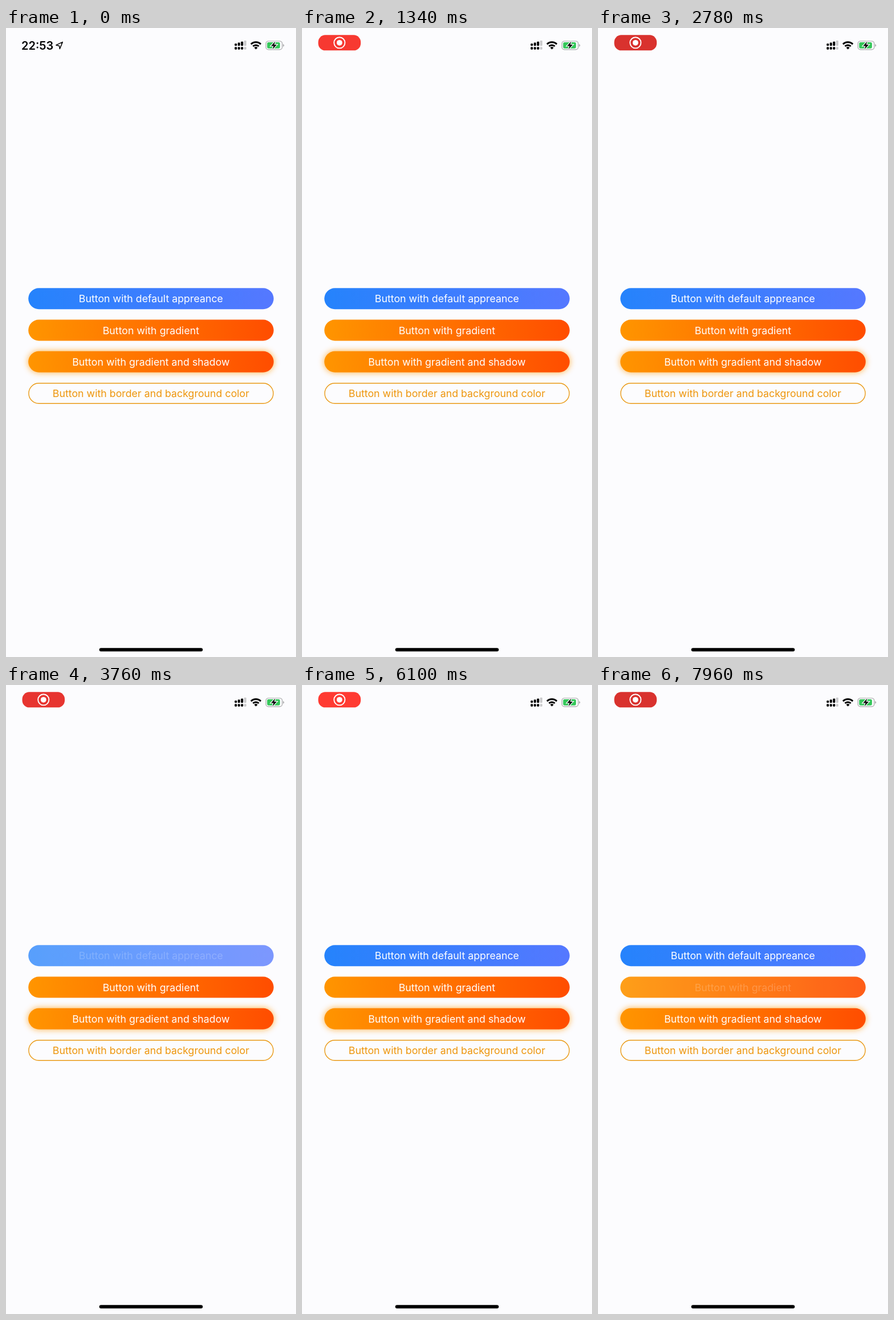
Animation of 509x1101 px, one loop 8 s. Source, as an HTML page:

```html
<!DOCTYPE html>
<html lang="en">
<head>
<meta charset="utf-8">
<title>Buttons</title>
<style>
  html, body { margin: 0; width: 100%; height: 100%; overflow: hidden; background: #fcfcfe; }
  svg { display: block; width: 100vw; height: 100vh; }
  text { font-family: Inter, Roboto, sans-serif; }
  .title { font-size: 17.8px; text-anchor: middle; }
</style>
</head>
<body>
<svg viewBox="0 0 509 1101">
  <defs>
    <linearGradient id="blue">
      <stop offset="0" stop-color="#2583fc"/><stop offset="1" stop-color="#5578ff"/>
    </linearGradient>
    <linearGradient id="orange">
      <stop offset="0" stop-color="#ff9500"/><stop offset="1" stop-color="#ff4d00"/>
    </linearGradient>
    <filter id="blur" x="-10%" y="-100%" width="120%" height="300%">
      <feGaussianBlur stdDeviation="6.1"/>
    </filter>
  </defs>
  <rect width="509" height="1101" fill="#fcfcfe"/>

  <g id="clock">
    <text x="27" y="37.7" font-size="20" font-weight="600">22:53</text>
    <path d="M99.3 24.6 L87.9 29.9 L93.4 31.2 L94.4 36.5 Z" fill="none" stroke="#000" stroke-width="1.5" stroke-linejoin="round"/>
  </g>

  <g id="pill">
    <rect id="pillBody" x="-37.3" y="-13.5" width="74.6" height="27" rx="12.3"/>
    <circle r="9.6" fill="none" stroke="#fff" stroke-width="1.9"/>
    <circle r="4.9" fill="#fff"/>
  </g>

  <g id="signal"></g>

  <g fill="none" stroke="#000" stroke-width="3">
    <path d="M430 28.4 A12.2 12.2 0 0 1 447.2 28.4"/>
    <path d="M433.5 32 A7.2 7.2 0 0 1 443.7 32"/>
    <path d="M438.6 37.6 L435.6 34.5 A4.3 4.3 0 0 1 441.6 34.5 Z" fill="#000" stroke="none"/>
  </g>

  <g>
    <rect x="456.2" y="23" width="28.6" height="14.8" rx="4.4" fill="none" stroke="#a6a6a8" stroke-width="1.2"/>
    <path d="M486.3 28 Q488.2 28.6 488.2 30.4 Q488.2 32.2 486.3 32.8 Z" fill="#a6a6a8"/>
    <rect x="458.3" y="25.1" width="22.6" height="10.6" rx="2.6" fill="#34c759"/>
    <path d="M472.4 23.6 L465.2 31.4 H469.6 L467.8 37.2 L475.2 29.3 H470.7 Z" fill="#000" stroke="#fcfcfe" stroke-width="2.4" paint-order="stroke"/>
  </g>

  <g id="buttons"></g>
  <rect x="163.7" y="1085.2" width="181.6" height="6" rx="3"/>
</svg>
<script>
const LOOP = 8000;
const byId = id => document.getElementById(id);
const clamp = v => Math.min(1, Math.max(0, v));
const mix = (a, b, p) => a + (b - a) * p;

// Eased progress from 0 to 1 between two times.
function ease(t, from, to) {
  const p = clamp((t - from) / (to - from));
  return p * p * (3 - 2 * p);
}

function add(parent, tag, attrs, text = "") {
  const el = document.createElementNS("http://www.w3.org/2000/svg", tag);
  for (const key in attrs) el.setAttribute(key, attrs[key]);
  el.textContent = text;
  return parent.appendChild(el);
}

// Two stacked signal meters; the last column is inactive.
for (let i = 0; i < 4; i++) {
  const x = 401.3 + i * 5.5, top = 27.3 - i * 1.75;
  const fill = i < 3 ? "#000" : "#c9c9cb";
  add(byId("signal"), "rect", { x, y: top, width: 4, height: 31.2 - top, rx: 1.1, fill });
  add(byId("signal"), "rect", { x, y: 33.3, width: 4, height: 4.4, rx: 1.1, fill });
}

function makeButton(label, index, paint, shadow) {
  const y = 455.3 + index * 55.27;
  const box = { x: 39.2, y, width: 430.6, height: 36.9, rx: 18.45 };
  const group = add(byId("buttons"), "g", {});
  if (shadow) add(group, "rect", { ...box, fill: "#ff9500", opacity: 0.75, filter: "url(#blur)" });
  if (paint) {
    add(group, "rect", { ...box, fill: paint });
  } else {
    add(group, "rect", {
      x: 39.9, y: y + 0.7, width: 429.2, height: 35.5, rx: 17.75,
      fill: "#fcfcfe", stroke: "#ea9a16", "stroke-width": 1.4
    });
  }
  const title = add(group, "text",
    { class: "title", x: 254.4, y: y + 25, fill: paint ? "#fff" : "#ee960c" }, label);
  return { group, title };
}

const basic = makeButton("Button with default appreance", 0, "url(#blue)");
const gradient = makeButton("Button with gradient", 1, "url(#orange)");
makeButton("Button with gradient and shadow", 2, "url(#orange)", true);
makeButton("Button with border and background color", 3);

// The title dims at once on touch; the body fades, and both recover on release.
function press(button, t, down, up) {
  const recover = ease(t, up, up + 400);
  const body = mix(1, 0.76, ease(t, down, down + 250));
  button.group.setAttribute("opacity", mix(body, 1, recover));
  button.title.setAttribute("opacity", t < down ? 1 : mix(0.2, 1, recover));
}

function drawPill(t) {
  const show = ease(t, 480, 780);
  const dark = ease(t, 1000, 2150) - ease(t, 3300, 4400) + ease(t, 6600, 7750);
  const rgb = [mix(255, 217, dark), mix(59, 50, dark), mix(50, 46, dark)].map(Math.round);
  byId("pillBody").setAttribute("fill", `rgb(${rgb})`);
  byId("pill").setAttribute("opacity", show);
  byId("pill").setAttribute("transform", `translate(65.8 25.8) scale(${mix(0.5, 1, show)})`);
  byId("clock").setAttribute("opacity", 1 - ease(t, 400, 600));
}

function draw(t) {
  drawPill(t);
  press(basic, t, 3300, 4670);
  press(gradient, t, 7850, LOOP);
}

const start = performance.now();
function tick() {
  draw((performance.now() - start) % LOOP);
  requestAnimationFrame(tick);
}
tick();
</script>
</body>
</html>
```
